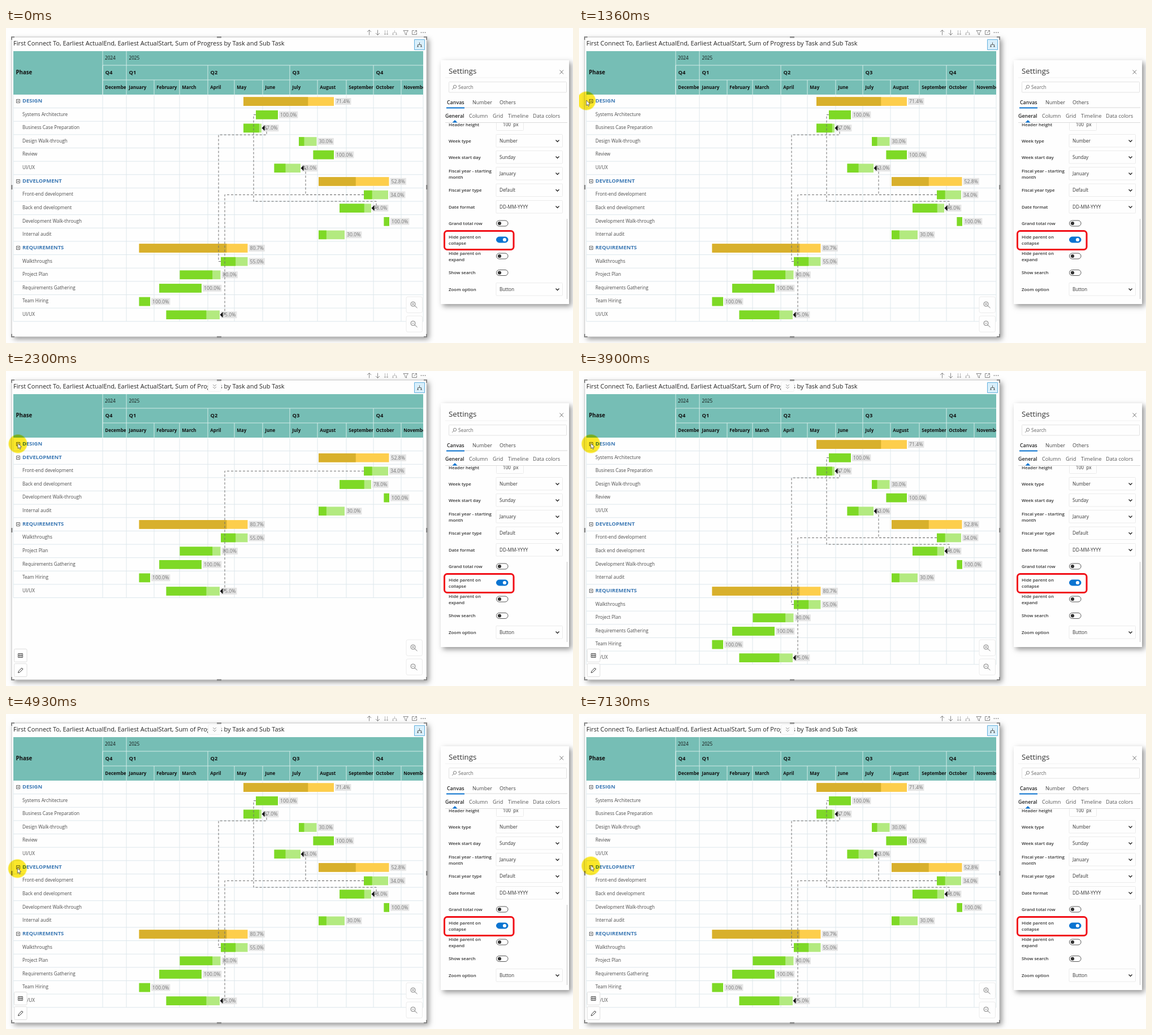
Recreate the animation shown at these times as an HTML page with a canvas. Size 1003x558 px, loop 8 s.

```html
<!DOCTYPE html>
<html lang="en">
<head>
<meta charset="utf-8">
<title>Gantt chart: hide parent on collapse</title>
<style>
html, body { margin: 0; width: 100%; height: 100%; overflow: hidden; background: #fefefe; }
canvas { display: block; width: 1003px; height: 558px; }
</style>
</head>
<body>
<canvas id="stage"></canvas>
<script>
const W = 1003, H = 558, LOOP = 8000;
const canvas = document.getElementById('stage');
const ctx = canvas.getContext('2d');
const dpr = window.devicePixelRatio || 1;
canvas.width = W * dpr;
canvas.height = H * dpr;

const TEAL = '#76beb5', GRID = '#dde7ec', BLUE = '#0b74d1';
const ROW_TOP = 118, ROW_H = 23.63;
const COLUMNS = [171, 213, 262, 307, 357, 404, 454, 502, 551, 602, 650, 699, 738];
const MONTHS = ['December', 'January', 'February', 'March', 'April', 'May', 'June', 'July',
  'August', 'September', 'October', 'November'];
const QUARTERS = [['Q4', 171], ['Q1', 213], ['Q2', 357], ['Q3', 502], ['Q4', 650]];

// name, bar start, bar end, progress
const ROWS = [
  ['DESIGN', 420, 580, 71.4],
  ['Systems Architecture', 442, 481, 100],
  ['Business Case Preparation', 420, 452, 87],
  ['Design Walk-through', 518, 549.5, 30],
  ['Review', 543.5, 580, 100],
  ['UI/UX', 474.5, 521, 43],
  ['DEVELOPMENT', 553, 677.5, 52.8],
  ['Front-end development', 633, 676, 34],
  ['Back end development', 590, 646, 78],
  ['Development Walk-through', 668.5, 678, 100],
  ['Internal audit', 553, 599, 30],
  ['REQUIREMENTS', 235.5, 427.5, 80.7],
  ['Walkthroughs', 380, 427.5, 55],
  ['Project Plan', 307.5, 379.5, 80],
  ['Requirements Gathering', 271, 346, 100],
  ['Team Hiring', 235.5, 255, 100],
  ['UI/UX', 283.5, 378, 75],
].map(([name, x0, x1, pct]) => ({ name, x0, x1, pct, parent: name.length > 5 && name === name.toUpperCase() }));

// start row, arrow row, x of the long vertical, x of the short one, offset of the jog
const LINKS = [
  [12, 2, 376, 461, 12],
  [1, 8, 438, 655, -12],
  [7, 5, 530, 530, 0],
  [7, 16, 387, 387, 0],
];

// time, x, y
const CURSOR = [
  [800, 861, 556], [900, 790, 505], [1000, 600, 410], [1100, 360, 290], [1200, 150, 185],
  [1280, 50, 142], [1360, 13, 129], [1480, 14, 131], [1560, 18, 133], [1630, 18, 133],
  [1730, 21, 129], [4400, 21, 129], [4430, 20, 137], [4480, 17, 163], [4560, 13, 219],
  [4640, 14, 256], [4720, 16, 274], [4800, 18, 281], [4900, 20, 276], [5000, 21, 269],
];

function font(size, weight = 400) {
  ctx.font = `${weight} ${size}px "Open Sans", "Noto Sans", sans-serif`;
}

function text(str, x, midY, size, color = '#333', weight = 400) {
  font(size, weight);
  ctx.fillStyle = color;
  ctx.fillText(str, x, midY + size * 0.36);
}

function rect(x, y, w, h, color) {
  ctx.fillStyle = color;
  ctx.fillRect(x, y, w, h);
}

function box(x, y, w, h, r, fill, stroke, width = 1) {
  ctx.beginPath();
  ctx.roundRect(x, y, w, h, r);
  if (fill) { ctx.fillStyle = fill; ctx.fill(); }
  if (stroke) { ctx.strokeStyle = stroke; ctx.lineWidth = width; ctx.stroke(); }
}

function line(points, color, width = 1) {
  ctx.beginPath();
  points.forEach(([x, y]) => ctx.lineTo(x, y));
  ctx.strokeStyle = color;
  ctx.lineWidth = width;
  ctx.stroke();
}

function poly(points, fill) {
  ctx.beginPath();
  points.forEach(([x, y]) => ctx.lineTo(x, y));
  ctx.closePath();
  ctx.fillStyle = fill;
  ctx.fill();
}

function circle(x, y, r, fill, stroke) {
  ctx.beginPath();
  ctx.arc(x, y, r, 0, Math.PI * 2);
  if (fill) { ctx.fillStyle = fill; ctx.fill(); }
  if (stroke) { ctx.strokeStyle = stroke; ctx.lineWidth = 1; ctx.stroke(); }
}

const vLine = (x, y0, y1, color) => rect(x - 0.5, y0, 1, y1 - y0, color);
const hLine = (y, x0, x1, color) => rect(x0, y - 0.5, x1 - x0, 1, color);

function clipped(x, y, w, h, draw) {
  ctx.save();
  ctx.beginPath();
  ctx.rect(x, y, w, h);
  ctx.clip();
  draw();
  ctx.restore();
}

function card(x, y, w, h) {
  ctx.save();
  ctx.shadowColor = 'rgba(0,0,0,.42)';
  ctx.shadowBlur = 9 * dpr;
  ctx.shadowOffsetX = ctx.shadowOffsetY = 4 * dpr;
  rect(x, y, w, h, '#fefefe');
  ctx.restore();
}

function chevron(x, y, r, color, width) {
  line([[x - r, y - r / 2], [x, y + r / 2], [x + r, y - r / 2]], color, width);
}

function hierarchy(x, y, color) {
  line([[x, y - 4], [x, y], [x - 3, y], [x - 3, y + 3]], color, 0.9);
  line([[x, y], [x + 3, y], [x + 3, y + 3]], color, 0.9);
  rect(x - 4, y + 2.2, 2, 2, color);
  rect(x + 2, y + 2.2, 2, 2, color);
}

function toolbar() {
  const c = '#888';
  const arrow = (x, dir, tall) => {
    line([[x, 8 - tall], [x, 8 + tall]], c);
    line([[x - 3.5, 8 + dir * (tall - 3.5)], [x, 8 + dir * tall], [x + 3.5, 8 + dir * (tall - 3.5)]], c);
  };
  arrow(642.5, -1, 4.5);
  arrow(657.5, 1, 4.5);
  ctx.globalAlpha = 0.6;
  for (const x of [670.5, 674.5]) {
    line([[x, 4], [x, 12]], c);
    line([[x - 1.5, 10], [x, 12], [x + 1.5, 10]], c);
  }
  hierarchy(687.5, 8, c);
  ctx.globalAlpha = 1;
  line([[703, 4.5], [711.5, 4.5], [708.5, 8.5], [708.5, 12], [706, 11], [706, 8.5], [703, 4.5]], c);
  line([[722, 4.5], [718.5, 4.5], [718.5, 11.5], [726.5, 11.5], [726.5, 8]], c);
  line([[721.5, 9], [726.5, 4.5]], c);
  line([[723.5, 4.5], [726.5, 4.5], [726.5, 7]], c);
  for (const x of [734.5, 738, 741.5]) circle(x, 8, 0.9, c);
}

function frame() {
  card(10, 16, 734, 531);
  ctx.strokeStyle = '#c6c6c6';
  ctx.lineWidth = 1;
  ctx.strokeRect(10, 16, 734, 531);
  const g = '#888';
  for (const [x, y, sx, sy] of [[10, 16, 1, 1], [744, 16, -1, 1], [10, 547, 1, -1], [744, 547, -1, -1]])
    line([[x + sx * 5, y], [x, y], [x, y + sy * 5]], g, 2);
  for (const y of [16, 547]) rect(373, y - 1, 8, 2.5, g);
  for (const x of [10, 744]) rect(x - 1, 278, 2.5, 8, g);
  text('First Connect To, Earliest ActualEnd, Earliest ActualStart, Sum of Progress by Task and Sub Task',
    13, 27, 10.97, '#252423');
  box(722.5, 20.5, 18, 18, 0, '#d9effb', '#63b1de');
  hierarchy(731.5, 29.5, '#555');
}

function header() {
  const edge = '#d2ebe8';
  rect(13, 41, 725, 77, TEAL);
  hLine(66, 171, 738, edge);
  hLine(92, 171, 738, edge);
  text('Phase', 17.5, 79, 9.7, '#111', 700);
  text('2024', 175, 53, 8.2, '#111');
  text('2025', 217.5, 53, 8.2, '#111');
  vLine(171, 41, 118, edge);
  vLine(213, 41, 66, edge);
  for (const [name, x] of QUARTERS) {
    vLine(x, 66, 92, edge);
    text(name, x + 4.5, 79, 9.3, '#111', 700);
  }
  MONTHS.forEach((name, i) => {
    const x = COLUMNS[i];
    vLine(x, 92, 118, edge);
    clipped(x, 92, COLUMNS[i + 1] - x, 26, () => text(name, x + 4.3, 105, 8, '#111', 700));
  });
}

function toggleBox(y, closed) {
  box(18.5, y - 3.5, 6, 6, 0, '#fff', '#555', 0.9);
  line([[20, y - 0.5], [23, y - 0.5]], '#333');
  if (closed) line([[21.5, y - 2], [21.5, y + 1]], '#333');
}

function bar({ x0, x1, pct, parent }, top) {
  const w = x1 - x0, y = top + 4.3, h = 15.6;
  rect(x0, y, w, h, parent ? '#fdce4c' : '#b3ea80');
  rect(x0, y, w * pct / 100, h, parent ? '#d8b02c' : '#7ed926');
  const label = pct.toFixed(1) + '%';
  font(8.7);
  rect(x1 + 2, top + 6, ctx.measureText(label).width + 4, 12, '#e5e5e5');
  text(label, x1 + 4, top + 12, 8.7, '#777');
}

function link([from, to, mainX, endX, jog], tops) {
  if (tops[from] === undefined || tops[to] === undefined) return;
  const y0 = tops[from] + 12;
  const y1 = tops[to] + 12;
  const tip = ROWS[to].x1 + 1;
  const path = [[ROWS[from].x0, y0], [mainX, y0], [mainX, y1 + jog], [endX, y1 + jog], [endX, y1], [tip + 5, y1]];
  ctx.setLineDash([4, 3]);
  line(path, '#6c6c6c');
  ctx.setLineDash([]);
  poly([[tip - 0.5, y1], [tip + 4.5, y1 - 5], [tip + 4.5, y1 + 5]], '#111');
}

function chart(closed) {
  const tops = {};
  let count = 0, group = -1;
  ROWS.forEach((row, i) => {
    if (row.parent) group = i;
    if (row.parent || group !== closed) tops[i] = ROW_TOP + ROW_H * count++;
  });
  const bottom = ROW_TOP + ROW_H * count;
  for (const x of [13, ...COLUMNS]) vLine(x, ROW_TOP, bottom, GRID);
  for (let i = 1; i <= count; i++) hLine(ROW_TOP + ROW_H * i, 13, 738, GRID);
  ROWS.forEach((row, i) => {
    const top = tops[i];
    if (top === undefined) return;
    if (row.parent) {
      toggleBox(Math.round(top + 12), i === closed);
      text(row.name, 29, top + 11, 9.45, '#3b78b4', 700);
    } else {
      text(row.name, 29, top + 11, 8.2, '#4c4c4c');
    }
    if (i !== closed) bar(row, top);
  });
  LINKS.forEach(l => link(l, tops));
}

function zoomButtons() {
  const c = '#7c7c7c';
  [490, 524].forEach((y, i) => {
    box(708, y - 14, 28.5, 28.5, 3, '#fefefe', '#ececec');
    circle(720, y - 1, 4, null, c);
    line([[723, y + 2], [727.5, y + 6]], c);
    line([[718, y - 1], [722, y - 1]], c, 0.8);
    if (i === 0) line([[720, y - 3], [720, y + 1]], c, 0.8);
  });
}

function hoverButtons() {
  box(357.5, 18.5, 23, 18, 3, '#fcfcfc', '#f0f0f0');
  chevron(369, 25.5, 3, '#888', 0.9);
  chevron(369, 29.5, 3, '#888', 0.9);
  for (const y of [492.5, 518.5]) box(14.5, y, 22.5, 23, 2, '#fff', '#dedede');
  box(21.5, 500.5, 8, 7, 0, null, '#555');
  line([[21.5, 504], [29.5, 504]], '#555');
  for (const x of [24, 27]) line([[x, 500.5], [x, 507.5]], '#555');
  line([[21.5, 534.5], [22.5, 531.5], [28, 526], [30, 528], [24.5, 533.5], [21.5, 534.5]], '#333');
}

function select(y, value) {
  box(867, y - 11.5, 117.5, 22.5, 1, '#fefefe', '#ebebeb');
  text(value, 873, y, 8.2, '#333');
  chevron(975.5, y, 3, '#222', 1.3);
}

function toggle(y, on) {
  box(867.5, y - 5, 20.5, 10, 5, on ? BLUE : '#fff', on ? BLUE : '#555');
  circle(on ? 882 : 873, y, 3.1, on ? '#fff' : '#333');
}

function settings() {
  card(769, 57, 227, 432);
  text('Settings', 783, 76, 13.3, '#333');
  line([[979.5, 74.5], [986, 81.5]], '#666', 0.9);
  line([[986, 74.5], [979.5, 81.5]], '#666', 0.9);
  hLine(88, 777, 993, '#f3f3f3');
  box(783.5, 95.5, 208, 18.5, 1, '#fefefe', '#e2e2e2');
  circle(794, 104, 2.7, null, '#888');
  line([[792, 106], [789, 109]], '#888');
  text('Search', 800, 105, 8.5, '#666');

  text('Canvas', 780, 132, 8.9, '#222', 600);
  text('Number', 825, 132, 9, '#444');
  text('Others', 873, 132, 9, '#444');
  hLine(141, 779, 993, '#dadada');
  rect(779, 140.5, 32, 2, BLUE);

  text('General', 777, 155.5, 8.9, '#222', 600);
  text('Column', 819, 155.5, 9.15, '#555');
  text('Grid', 861, 155.5, 9.15, '#555');
  text('Timeline', 888, 155.5, 9.15, '#555');
  text('Data colors', 932, 155.5, 9.15, '#555');
  hLine(167.5, 777, 993, '#dadada');
  poly([[789.5, 167.5], [794, 163], [798.5, 167.5]], BLUE);

  const label = (str, y) => text(str, 783, y, 7.9, '#333', 600);
  clipped(770, 168, 226, 20, () => {
    label('Header height', 171);
    box(867.5, 160.5, 48, 21, 1, '#fefefe', '#ebebeb');
    text('100  px', 879, 171, 8.2, '#333');
  });
  label('Week type', 200);
  select(200, 'Number');
  label('Week start day', 229);
  select(229, 'Sunday');
  label('Fiscal year - starting', 253);
  label('month', 264);
  select(258, 'January');
  label('Fiscal year type', 287.5);
  select(287.5, 'Default');
  label('Date format', 317);
  select(317, 'DD-MM-YYYY');
  label('Grand total row', 346);
  toggle(346, false);
  label('Hide parent on', 370);
  label('collapse', 381);
  toggle(375, true);
  label('Hide parent on', 399.5);
  label('expand', 410.5);
  toggle(404, false);
  label('Show search', 433.5);
  toggle(433.5, false);
  label('Zoom option', 463);
  select(463, 'Button');
  vLine(992.5, 338, 480, '#c4c4c4');
  box(775.5, 359.5, 122.5, 33, 5, null, '#f10d16', 3);
}

function cursorAt(t) {
  const next = CURSOR.findIndex(k => k[0] > t);
  if (next < 0) return CURSOR[CURSOR.length - 1].slice(1);
  const [t0, x0, y0] = CURSOR[next - 1], [t1, x1, y1] = CURSOR[next];
  const k = (t - t0) / (t1 - t0);
  return [x0 + (x1 - x0) * k, y0 + (y1 - y0) * k];
}

function cursor(x, y) {
  const glow = ctx.createRadialGradient(x, y, 0, x, y, 17.5);
  glow.addColorStop(0, 'rgba(252,230,24,.95)');
  glow.addColorStop(0.88, 'rgba(252,231,28,.92)');
  glow.addColorStop(1, 'rgba(253,236,60,0)');
  ctx.globalCompositeOperation = 'multiply';
  circle(x, y, 17.5, glow);
  ctx.globalCompositeOperation = 'source-over';
  const tip = [[0, -1], [0, 8.3], [2.1, 6.5], [3.5, 9.6], [5, 8.9], [3.7, 6], [6.4, 5.7]]
    .map(([dx, dy]) => [x + dx, y + dy]);
  poly(tip, '#fff');
  line([...tip, tip[0]], '#444', 0.8);
}

function draw(t) {
  ctx.setTransform(dpr, 0, 0, dpr, 0, 0);
  rect(0, 0, W, H, '#fefefe');
  toolbar();
  frame();
  header();
  const closed = t >= 2300 && t < 3900 ? 0 : t >= 5330 && t < 7130 ? 6 : -1;
  chart(closed);
  zoomButtons();
  if (t >= 1440) hoverButtons();
  settings();
  if (t >= 800) cursor(...cursorAt(t));
}

function tick() {
  draw(performance.now() % LOOP);
  requestAnimationFrame(tick);
}
tick();
</script>
</body>
</html>
```
